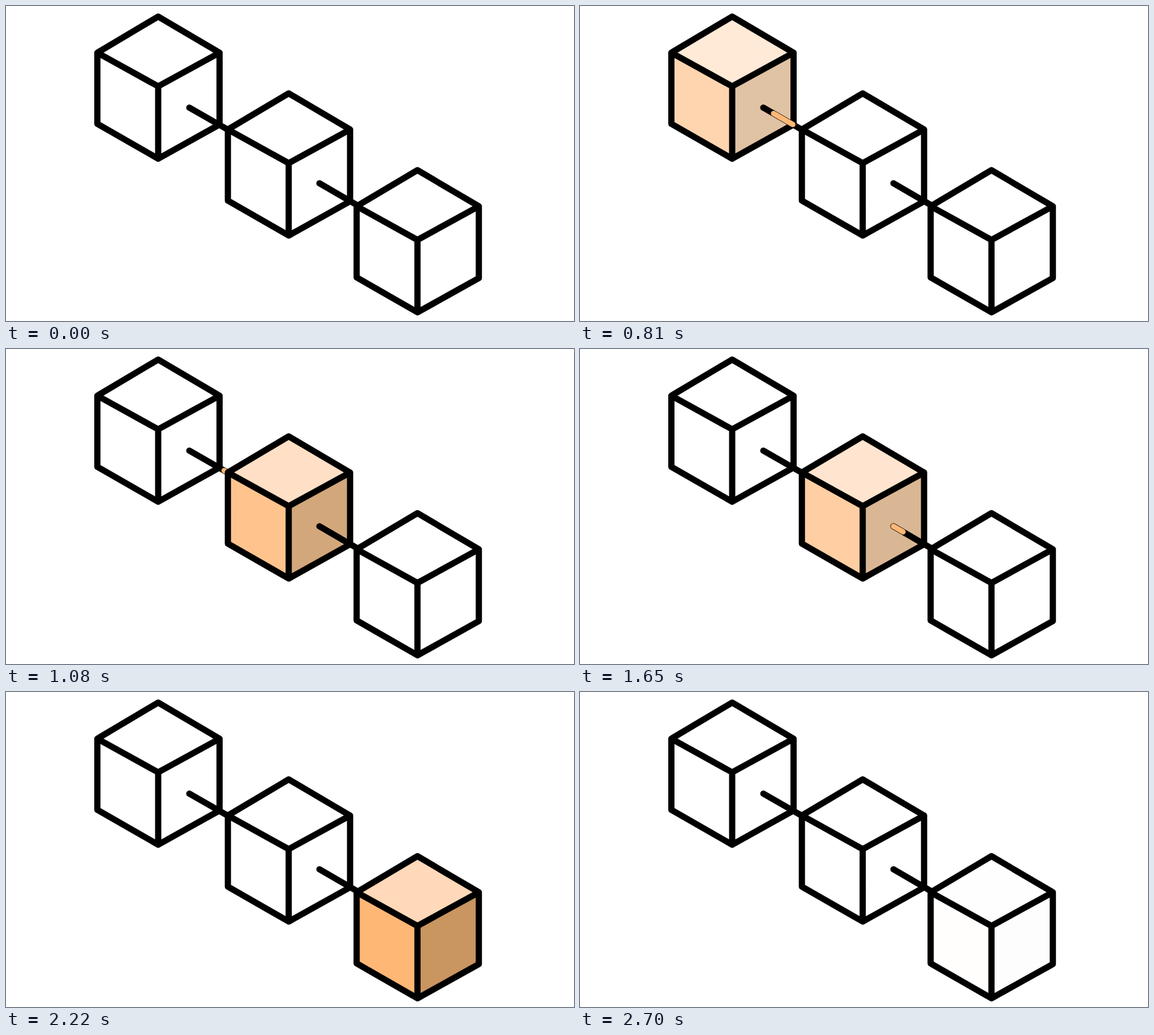
An HTML page for the animation above (2730 ms loop, 1004 px wide and 558 px high).

```html
<!DOCTYPE html>
<html lang="en">
<head>
<meta charset="utf-8">
<title>Linked cubes</title>
<style>
  html, body { margin: 0; width: 100%; height: 100%; overflow: hidden; background: #fff; }
  svg { display: block; width: 100%; height: 100%; }
  .line { fill: none; stroke: #000; stroke-width: 11; stroke-linecap: round; stroke-linejoin: round; }
  .dash { stroke: #ffb775; stroke-width: 9.4; stroke-linecap: round; }
</style>
</head>
<body>
<svg viewBox="0 0 1004 558"></svg>
<script>
const LOOP = 2730, HALF_GLOW = 455, DASH_TIME = 634;

// Positions are those of each cube's top corner; times are in ms.
const cubes = [
  { x: 269, y: 18.7, peak: 467 },
  { x: 499.7, y: 154.8, peak: 1337 },
  { x: 727.3, y: 290.8, peak: 2247 }
];
const links = [
  { from: [324, 180], to: [392, 219], start: 487 },
  { from: [554, 314], to: [621, 353], start: 1544 }
];

const svg = document.querySelector('svg');

function add(parent, tag, attrs) {
  const el = document.createElementNS('http://www.w3.org/2000/svg', tag);
  for (const key in attrs) el.setAttribute(key, attrs[key]);
  return parent.appendChild(el);
}

function setLine(el, [x1, y1], [x2, y2]) {
  Object.entries({ x1, y1, x2, y2 }).forEach(([key, value]) => el.setAttribute(key, value));
}

const outline = 'M0 0L108.5 64V191.2L0 251.8L-107.5 190V64Z';

cubes.forEach((cube, i) => {
  const g = add(svg, 'g', { transform: `translate(${cube.x} ${cube.y})` });
  add(g, 'path', { d: outline, fill: '#fff' });
  cube.faces = add(g, 'g', { opacity: 0 });
  add(cube.faces, 'path', { d: 'M0 0L108.5 64L0 123.6L-107.5 64Z', fill: '#ffd9b9' });
  add(cube.faces, 'path', { d: 'M-107.5 64L0 123.6V251.8L-107.5 190Z', fill: '#ffb775' });
  add(cube.faces, 'path', { d: 'M108.5 64L0 123.6V251.8L108.5 191.2Z', fill: '#c99560' });
  add(g, 'path', { class: 'line', d: outline + 'M-107.5 64L0 123.6L108.5 64M0 123.6V251.8' });

  const link = links[i];
  if (!link) return;
  setLine(add(svg, 'line', { class: 'line' }), link.from, link.to);
  link.dash = add(svg, 'line', { class: 'dash' });
});

const clamp = v => Math.min(1, Math.max(0, v));

function draw(now) {
  const t = now % LOOP;
  for (const { faces, peak } of cubes) {
    faces.setAttribute('opacity', clamp(1 - Math.abs((t - peak) / HALF_GLOW) ** 3));
  }
  for (const { dash, from, to, start } of links) {
    const p = (t - start) / DASH_TIME;
    const at = f => from.map((v, k) => v + (to[k] - v) * clamp(f));
    dash.setAttribute('visibility', p > 0 && p < 1 ? 'visible' : 'hidden');
    setLine(dash, at(1.5 * p - 0.5), at(1.5 * p));
  }
}

const begin = performance.now();
function tick() {
  draw(performance.now() - begin);
  requestAnimationFrame(tick);
}
tick();
</script>
</body>
</html>
```
